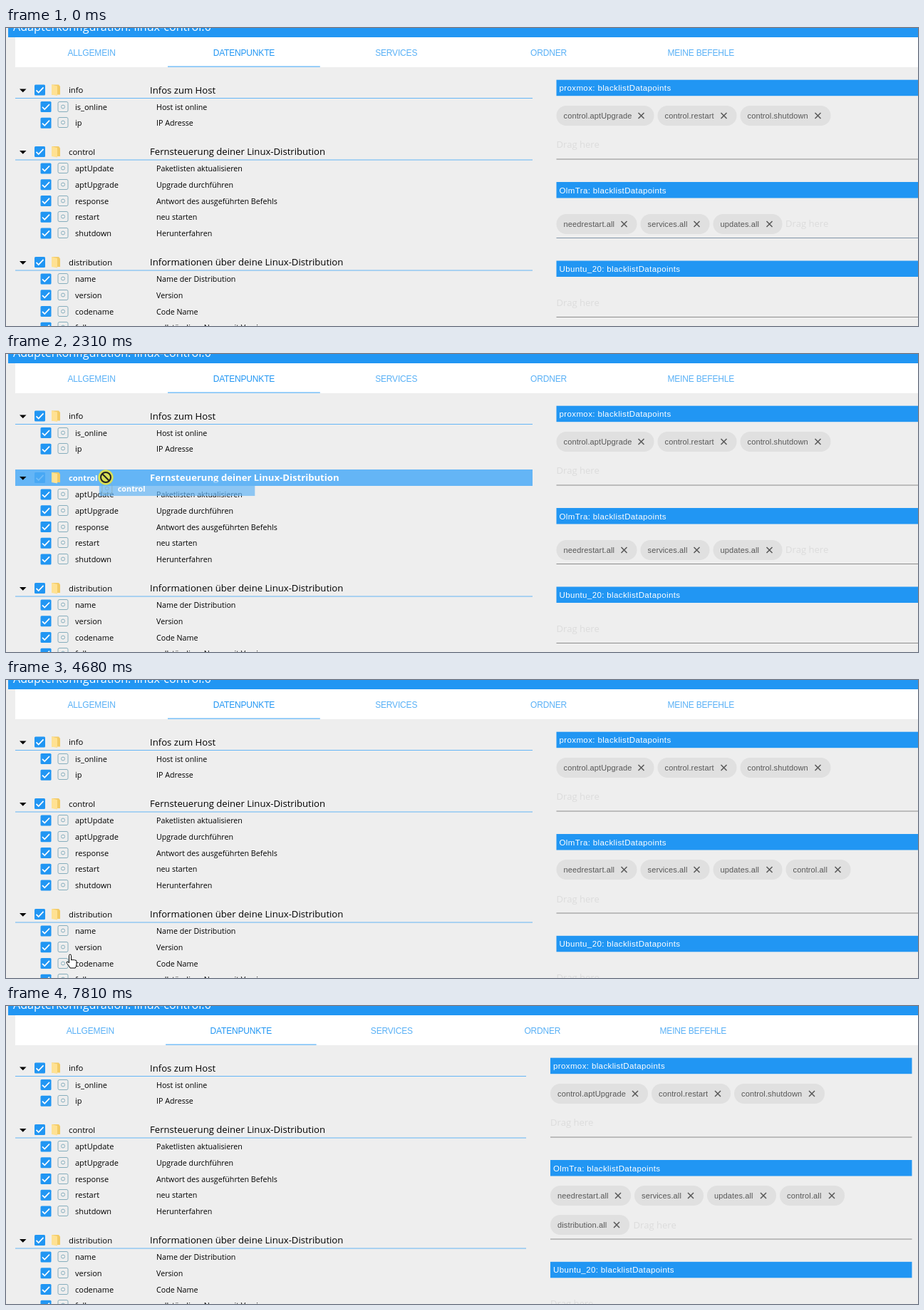
An HTML page that plays this animation: 1280x418 px, repeating every 8990 ms.

```html
<!DOCTYPE html>
<html lang="de">
<head>
<meta charset="utf-8">
<title>Adapterkonfiguration</title>
<style>
html, body { margin: 0; width: 100%; height: 100%; overflow: hidden; background: #eee; }
svg { display: block; width: 1280px; height: 418px; }
text { white-space: pre; }
.head { font: 16.15px "Open Sans", sans-serif; fill: #fff; }
.tab { font: 12px "Liberation Sans", Arial, sans-serif; letter-spacing: -.18px; fill: #2196f3; text-anchor: middle; }
.title { font: 13.13px "Open Sans", sans-serif; }
.group { font: 11.3px "Open Sans", sans-serif; }
.name { font: 11px "Open Sans", sans-serif; }
.desc { font: 10.7px "Open Sans", sans-serif; }
.on { font-weight: 700; fill: #fff; }
.ghost { font: 700 10.8px "Open Sans", sans-serif; fill: #fff; }
.panel { font: 11.5px "Liberation Sans", Arial, sans-serif; letter-spacing: .38px; fill: #fff; }
.chip { font: 11px "Liberation Sans", Arial, sans-serif; letter-spacing: .13px; fill: #575757; }
.hint { font: 13.1px "Open Sans", sans-serif; fill: #dcdcdc; }
</style>
</head>
<body>
<svg id="stage" viewBox="0 0 1280 418"></svg>
<script>
const LOOP = 8990;
const BLUE = '#2196f3', LIGHT = '#64b5f6';

// Moments the picture updates: start, end, number of steps.
const RUNS = [
  [0, 0, 1], [70, 70, 1], [300, 1090, 10], [1260, 1350, 2], [1530, 1660, 3], [1910, 1910, 1],
  [2130, 2130, 1], [2310, 3160, 12], [3240, 3330, 2], [3880, 3960, 2], [4210, 4680, 7],
  [4830, 5070, 4], [5220, 5310, 2], [5460, 5460, 1], [5710, 6590, 12], [7290, 7360, 2], [7590, 7810, 4]
];

// Pointer track: time, x, y.
const TRACK = [
  [300, 620, 402], [500, 450, 340], [740, 210, 205], [914, 148, 167], [1002, 142, 170], [1090, 134, 172],
  [1260, 126, 172], [1350, 120, 171], [1660, 119, 170], [1910, 119, 169], [2280, 119, 169],
  [2310, 140, 173], [2450, 350, 200], [2600, 650, 240], [2745, 912, 274], [2774, 913, 274],
  [2851, 960, 277], [3005, 1065, 284], [3160, 1109, 286], [3240, 1110, 284], [3330, 1111, 282],
  [3880, 1113, 283], [4130, 1113, 283], [4290, 960, 308], [4450, 540, 355], [4680, 90, 385],
  [4830, 84, 338], [5070, 81, 334], [5220, 81, 331], [5310, 84, 329], [5650, 84, 329],
  [5710, 128, 331], [5790, 203, 334], [6000, 420, 345], [6270, 710, 325], [6430, 778, 314],
  [6510, 801, 310], [6590, 802, 310], [7510, 802, 312], [7590, 850, 322], [7810, 1270, 408]
];

const GROUPS = [
  { name: 'info', title: 'Infos zum Host', y: 87, rows: [['is_online', 'Host ist online'], ['ip', 'IP Adresse']] },
  { name: 'control', title: 'Fernsteuerung deiner Linux-Distribution', y: 173.5, rows: [
    ['aptUpdate', 'Paketlisten aktualisieren'], ['aptUpgrade', 'Upgrade durchführen'],
    ['response', 'Antwort des ausgeführten Befehls'], ['restart', 'neu starten'], ['shutdown', 'Herunterfahren']] },
  { name: 'distribution', title: 'Informationen über deine Linux-Distribution', y: 328.5, rows: [
    ['name', 'Name der Distribution'], ['version', 'Version'], ['codename', 'Code Name'],
    ['fullname', 'vollständiger Name mit Version']] }
];

const TABS = ['ALLGEMEIN', 'DATENPUNKTE', 'SERVICES', 'ORDNER', 'MEINE BEFEHLE'];
const APT_CHIPS = [['control.aptUpgrade', 137], ['control.restart', 111], ['control.shutdown', 127]];
const ALL_CHIPS = [['needrestart.all', 113], ['services.all', 97], ['updates.all', 97], ['control.all', 91], ['distribution.all', 111]];

const rect = (x, y, w, h, fill, more = '') => `<rect x="${x}" y="${y}" width="${w}" height="${h}" fill="${fill}" ${more}/>`;
const path = (d, more) => `<path d="${d}" ${more}/>`;
const text = (cls, x, y, s, more = '') => `<text class="${cls}" x="${x}" y="${y}" ${more}>${s}</text>`;
const at = (x, y, body) => `<g transform="translate(${x} ${y})">${body}</g>`;

function checkbox(x, y, dim) {
  return at(x, y, rect(-7.5, -7.5, 15, 15, dim ? '#48a8f4' : BLUE, 'rx="1.5"') +
    path('M-5 .3L-1.8 3.5L5-3.6', `fill="none" stroke="${dim ? '#74bdf7' : '#fff'}" stroke-width="1.7"`));
}

function stateIcon(x, y) {
  return at(x, y, '<g fill="none" stroke="#86aebd">' + rect(-7, -7, 14, 14, 'none', 'rx="2"') +
    '<circle r="2.5"/></g>');
}

function folder(x, y) {
  return at(x, y, path('M-6-7.5H4L6-5V6.5H-6Z', 'fill="#f3cb66"') +
    path('M-6-7.5L2-5.5V8L-6 6.5Z', 'fill="#ffe193"'));
}

function group(g, lit, right) {
  const y = g.y, cls = lit ? ' on' : '';
  let s = lit ? rect(13, y - 11.5, right - 13, 23, LIGHT) : rect(13, y + 11, right - 13, 1, LIGHT);
  s += path(`M19 ${y - 1.5}H28.5L23.75 ${y + 3.3}Z`, 'fill="#000"') + checkbox(47.5, y, lit) + folder(70, y) +
    text('group' + cls, 88, y + 4, g.name) + text('title' + cls, 202, y + 4.8, g.title);
  g.rows.forEach(([name, desc], i) => {
    const ry = y + 23.6 + i * 22.7;
    s += checkbox(56, ry) + stateIcon(80, Math.round(ry) - .5) +
      text('name', 97, ry + 4, name) + text('desc', 211, ry + 4, desc);
  });
  return s;
}

function chip(x, y, label, w) {
  return rect(x, y - 14, w, 28, '#e0e0e0', 'rx="14"') + text('chip', x + 10, y + 4, label) +
    path(`M${x + w - 22} ${y - 4}l8 8m0-8l-8 8`, 'stroke="#575757" stroke-width="1.5"');
}

function chips(x, y, list) {
  return list.map(([label, w]) => {
    const s = chip(x, y, label, w);
    x += w + 5;
    return s;
  }).join('');
}

const hint = (x, y) => text('hint', x, y + 4.7, 'Drag here');
const panel = (x, y, name) => rect(x, y, 507.5, 22.5, BLUE) + text('panel', x + 4, y + 15.6, name + ': blacklistDatapoints');
const underline = (x, y, color = '#8c8c8c') => rect(x, y, 507.5, 1, color);

function panels(x, count, fresh) {
  const grown = count > 3, y = grown ? 266 : 275, drop = grown ? 32.3 : 0;
  let s = panel(x, 72.7, 'proxmox') + chips(x, 123, APT_CHIPS) + hint(x, 163) + underline(x, 183.5) +
    panel(x, 216, 'OlmTra') + chips(x, y, ALL_CHIPS.slice(0, Math.min(count, 4)));
  if (count > 4) s += chips(x, 307, ALL_CHIPS.slice(4));
  s += hint(x + [321.5, 0, 116.5][count - 3], grown ? 307 : 274.5) +
    underline(x, grown ? 326.5 : 294, fresh ? '#7f93a6' : undefined) +
    panel(x, 326.5 + drop, 'Ubuntu_20') + hint(x, 385 + drop) + underline(x, 405 + drop);
  return s;
}

function tabs(narrow) {
  const x = narrow ? 12.6 : 13.2, w = narrow ? 211.5 : 213.8;
  return rect(13, 13, 1267, 42, '#fff') + rect(x + w, 53.5, w, 1.3, LIGHT) +
    TABS.map((s, i) => text('tab', x + w * (i + .5), 38.5, s, i === 1 ? '' : 'opacity=".75"')).join('');
}

const OUTLINE = 'fill="#fff" stroke="#000" stroke-width="1" stroke-linejoin="round"';
const ARROW = path('M0 0V16l3.7-3.5 2.4 5.6 2.3-1-2.4-5.4h5z', OUTLINE);
const CURSORS = {
  arrow: ARROW,
  move: rect(2, 13, 10, 7, '#fff', 'stroke="#000" stroke-dasharray="1.5 1"') + ARROW,
  hand: path('M-1.5 1.5a1.5 1.5 0 0 1 3 0V8q1-1.3 2.6-.2q1.4-1 2.6.3q1.8-.6 2.3 1.2V14q-.3 3-1.8 5H0q-1.5-3-4.5-6.5q-1.2-1.7.3-2.4q1.4-.3 2.7 1.9Z', OUTLINE),
  beam: path('M-3-6.5H-.8L0-5.8L.8-6.5H3M0-5.8V5.8M-3 6.5H-.8L0 5.8L.8 6.5H3', 'fill="none" stroke="#222" stroke-width="1.1"'),
  stop: '<g fill="none" stroke="#222" stroke-width="2"><circle r="7"/><path d="M-5-5L5 5"/></g>'
};

function cursorFor(x, y, drag) {
  if (drag) return x < 764 ? 'stop' : 'move';
  if (x < 739) return 'hand';
  return y > 240 && y < 330 ? 'beam' : 'arrow';
}

function pointer(t) {
  const i = TRACK.findIndex(p => p[0] >= t);
  if (i < 1) return TRACK[i < 0 ? TRACK.length - 1 : 0].slice(1);
  const [t0, x0, y0] = TRACK[i - 1], [t1, x1, y1] = TRACK[i];
  const k = (t - t0) / (t1 - t0);
  return [x0 + (x1 - x0) * k, y0 + (y1 - y0) * k];
}

// Latest update moment at or before t.
function snap(t) {
  const [start, end, n] = RUNS.filter(r => r[0] <= t).pop();
  if (n === 1) return start;
  const step = (end - start) / (n - 1);
  return start + step * Math.min(n - 1, Math.floor((t - start) / step + 1e-6));
}

function scene(t) {
  const narrow = t >= 6265;
  const count = 3 + (t >= 3880) + (t >= 7290);
  const drag = t >= 2310 && t < 3880 ? 'control' : t >= 5710 && t < 7290 ? 'distribution' : '';
  const pressed = t >= 2130 && t < 3880 || t >= 5460 && t < 7290;
  const visible = t >= 300 && t < 7809;
  const [x, y] = pointer(t);
  const lit = g => drag ? drag === g.name : visible && x < 739 && Math.abs(y - g.y) < 11.5;

  let s = rect(0, 0, 1280, 418, '#eee') + rect(3, 0, 1277, 13, BLUE) +
    text('head', 10, 4, 'Adapterkonfiguration: linux-control.0') + tabs(narrow) +
    GROUPS.map(g => group(g, lit(g), narrow ? 730 : 739)).join('') +
    panels(narrow ? 764 : 772.5, count, t < 70);
  if (drag) {
    const [gx, gy] = pointer(t - 26);
    s += at(gx + 9, gy + 9, rect(0, 0, 218.5, 20.5, LIGHT, 'opacity=".7"') +
      '<g opacity=".8">' + stateIcon(11, 10) + '</g>' + text('ghost', 26, 14.6, drag));
  }
  if (visible) {
    s += at(x, y, (pressed ? '<circle r="10.7" fill="#f5ea2e" opacity=".8"/>' : '') + CURSORS[cursorFor(x, y, drag)]);
  }
  return s;
}

const stage = document.getElementById('stage');
const born = performance.now();
let shown = -1;

function tick() {
  const t = snap((performance.now() - born) % LOOP);
  if (t !== shown) {
    shown = t;
    stage.innerHTML = scene(t);
  }
  requestAnimationFrame(tick);
}
tick();
</script>
</body>
</html>
```
